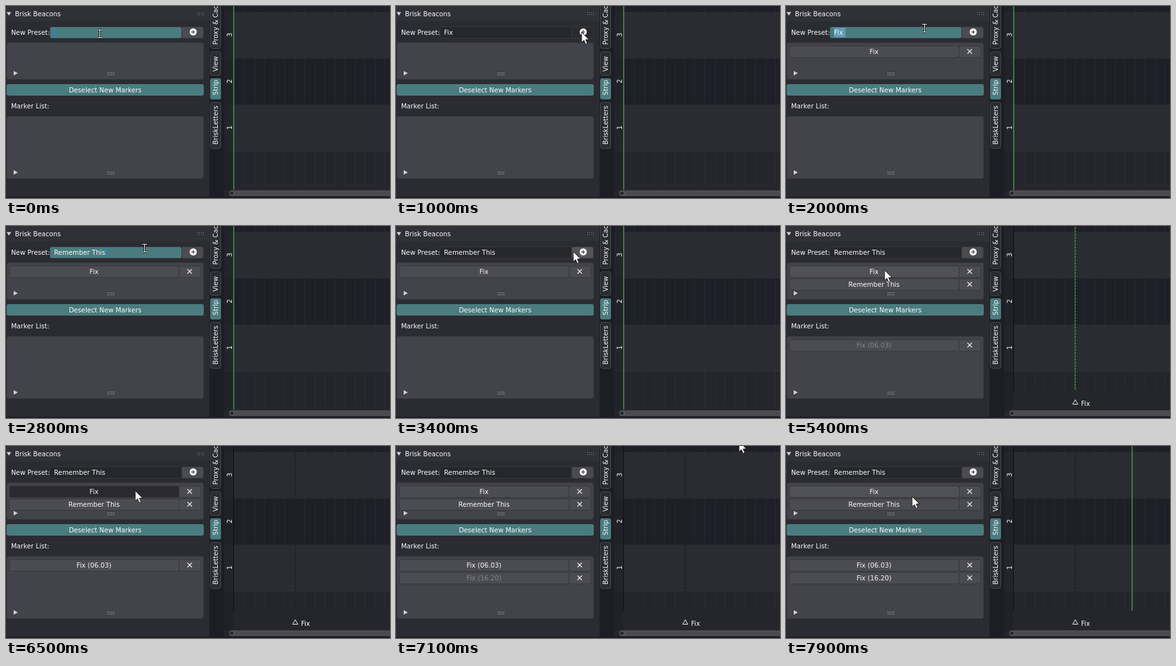
Animation of 600x300 px, one loop 8 s. Source, as an HTML page with a canvas:

```html
<!DOCTYPE html>
<html lang="en">
<head>
<meta charset="utf-8">
<style>
html, body { margin: 0; width: 100%; height: 100%; overflow: hidden; background: #2b2c31; }
canvas { display: block; }
</style>
</head>
<body>
<canvas id="stage" width="600" height="300"></canvas>
<script>
const g = document.getElementById('stage').getContext('2d');
const LOOP = 8000, SECOND = 15.75, ORIGIN = 356;
const TEAL = '#4a7b7f', TEXT = '#fafafc', BUTTON = '#4b4b52', EDGE = '#37373d', DOWN = '#2a2a2e';
const timeX = s => ORIGIN + s * SECOND;
const FIRST = timeX(6 + 3 / 24), SECOND_MARK = timeX(16 + 20 / 24);

// Each move: start, end, then the place reached
const pointerMoves = [
  [600, 1000, 290, 41], [1100, 1300, 220, 36], [1900, 2000, 216, 34],
  [2900, 3400, 277, 40], [3800, 4400, 453, -11], [4600, 5100, 154, 69],
  [5600, 5800, 588, 2], [5800, 6000, 202, 70],
  [6800, 7200, 541, -8], [7400, 7900, 197, 79]
];
const headMoves = [[4200, 4500, FIRST], [5600, 5900, SECOND_MARK], [7100, 7300, 541]];

// Ease out from one resting place to the next
function follow(start, moves, t) {
  let p = start;
  for (const [from, to, ...goal] of moves) {
    const f = Math.min(1, Math.max(0, (t - from) / (to - from)));
    const e = 1 - (1 - f) ** 3;
    p = p.map((v, i) => v + (goal[i] - v) * e);
  }
  return p;
}

const within = (v, a, b) => v >= a && v < b;

function rect(x, y, w, h, color) {
  g.fillStyle = color;
  g.fillRect(x, y, w, h);
}

function box(x, y, w, h, fill, edge, r = 3) {
  g.beginPath();
  if (edge) g.roundRect(x + .5, y + .5, w - 1, h - 1, r);
  else g.roundRect(x, y, w, h, r);
  g.fillStyle = fill;
  g.fill();
  if (edge) {
    g.lineWidth = 1;
    g.strokeStyle = edge;
    g.stroke();
  }
}

function poly(points, fill, edge) {
  g.beginPath();
  points.forEach(p => g.lineTo(...p));
  g.closePath();
  g.lineWidth = 1;
  if (fill) { g.fillStyle = fill; g.fill(); }
  if (edge) { g.strokeStyle = edge; g.stroke(); }
}

function disc(x, y, r, color) {
  g.beginPath();
  g.arc(x, y, r, 0, 7);
  g.fillStyle = color;
  g.fill();
}

function line(x1, y1, x2, y2, color, width = 1) {
  g.beginPath();
  g.moveTo(x1, y1);
  g.lineTo(x2, y2);
  g.strokeStyle = color;
  g.lineWidth = width;
  g.stroke();
}

function label(s, x, y, align = 'left', color = TEXT) {
  g.font = '10.2px "DejaVu Sans", sans-serif';
  g.textAlign = align;
  g.fillStyle = color;
  g.fillText(s, x, y + 4);
}

function upright(s, x, y, align) {
  g.save();
  g.translate(x, y);
  g.rotate(-Math.PI / 2);
  label(s, 0, 0, align);
  g.restore();
}

function grip(x, y, color) {
  for (let i = 0; i < 8; i++) rect(x + i % 4 * 3, y + (i >> 2) * 3, 1, 1, color);
}

function row(s, y, { hover, pressed, dim } = {}) {
  const c = y + 9;
  box(5, y, 266, 19, pressed ? DOWN : hover ? '#505057' : BUTTON, EDGE);
  label(s, 137.5, c, 'center', dim ? '#85858b' : TEXT);
  box(270, y, 35, 19, BUTTON, EDGE);
  for (const d of [-3.5, 3.5]) line(283.5, c - d, 290.5, c + d, TEXT, 1.1);
}

function listBox(y, h) {
  const c = y + h - 10;
  box(1, y, 308, h, '#43434b', '#3a3a41');
  poly([[12, c - 3.5], [18.5, c], [12, c + 3.5]], '#cfcfd2');
  grip(159, c - 1, '#e4e4e6');
}

function drawTimeline(head, marked) {
  const end = marked ? 257 : 284;
  rect(341, 0, 259, 300, '#25262c');
  // Tracks alternate light and dark
  for (let i = 0; i < 4; i++) {
    const y = 9 + (i - 1) * 72.5;
    rect(i % 2 ? 341 : ORIGIN, Math.round(y), 259, 73, i % 2 ? '#2b2c31' : '#1e1f27');
  }
  for (let x = timeX(1); x < 600; x += SECOND) {
    rect(Math.round(x), 0, 1, 9, '#282930');
    rect(Math.round(x), 81, 1, 73, '#282930');
    rect(Math.round(x), 227, 1, end - 227, '#2c2d33');
  }
  rect(341, 226, 259, 1, '#35363a');
  rect(341, 0, 14, 288, 'rgba(28,29,35,.45)');
  rect(355, 0, 1, end, '#0d0e12');
  for (let i = 0; i < 3; i++) upright(3 - i, 349, 45 + i * 72.5, 'center');

  rect(Math.round(head) - 1, 0, 1.5, marked ? 257 : 287, '#459a4a');
  if (marked) {
    g.setLineDash([2, 3]);
    line(452, 0, 452, 257, '#0c0d10');
    g.setLineDash([]);
    poly([[452, 271.5], [456, 278.5], [448, 278.5]], null, '#eee');
    label('Fix', 461, 277);
  }

  box(349, 288, 270, 9, '#4c4c50', null, 4);
  disc(353, 292.5, 4, '#66666a');
  disc(353, 292.5, 3, '#2c2c30');
}

function drawTabs() {
  rect(318, 0, 23, 300, '#1d1e24');
  let top = -30;
  for (const [s, h] of [['Proxy & Cache', 97], ['View', 38], ['Strip', 33], ['BriskLetters', 73]]) {
    const on = s === 'Strip';
    box(319, top, 17, h, on ? TEAL : '#2b2c31', on ? null : '#48494e');
    upright(s, 326.5, top + h - 6.5);
    top += h + 4;
  }
}

function drawField(t, x, y) {
  const active = t < 700 || within(t, 1600, 2900);
  const selected = within(t, 1700, 2100);
  const text = t < 2100 ? 'Fix'.slice(0, Math.max(0, t / 100 - 1))
    : 'Remember This'.slice(0, (t - 2000) / 50);
  label('New Preset:', 8, 41);
  box(68, 32, 207, 19, active ? TEAL : '#26272b', '#38393e');
  if (selected) rect(75, 34, 18, 15, '#629bb3');
  label(text, 75, 41);
  if (active && !selected) rect(75 + g.measureText(text).width, 34, 2, 15, '#3383c4');

  const pressed = within(t, 1000, 1100) || within(t, 3600, 3700);
  const hover = within(x, 274, 309) && within(y, 32, 51);
  box(274, 32, 35, 19, pressed ? DOWN : hover ? '#54545a' : BUTTON, '#38393e');
  disc(292.5, 40.5, 5.5, '#fff');
  rect(289.5, 40, 6, 1.2, '#3a3a3f');
  rect(292, 37.5, 1.2, 6, '#3a3a3f');
}

function drawPanel(t, x, y, head) {
  rect(0, 0, 318, 300, '#2b2c31');
  rect(0, 0, 318, 24, '#303136');
  poly([[1, 9.5], [8, 9.5], [4.5, 15]], '#d4d4d7');
  label('Brisk Beacons', 14, 12);
  grip(299, 10, '#8c8d91');
  drawField(t, x, y);

  listBox(57, 58);
  const hover = top => within(x, 5, 270) && within(y, top, top + 19);
  const pressed = within(t, 5300, 5400) || within(t, 6500, 6700);
  if (t >= 1100) row('Fix', 62, { hover: hover(62), pressed });
  if (t >= 3700) row('Remember This', 82, { hover: hover(82) });

  box(1, 122, 308, 18, TEAL);
  label('Deselect New Markers', 155, 131, 'center');
  label('Marker List:', 8, 156);
  listBox(172, 98);
  // A marker under the playhead is greyed
  const dim = mark => Math.abs(head - mark) < 2;
  if (t >= 5400) row('Fix (06.03)', 177, { dim: dim(FIRST) });
  if (t >= 6700) row('Fix (16.20)', 197, { dim: dim(SECOND_MARK) });
}

function drawPointer(x, y) {
  g.save();
  g.translate(Math.round(x), Math.round(y));
  if (within(x, 68, 274) && within(y, 32, 51)) {
    for (const [color, w] of [['#15191b', 3], ['#fff', 1]]) {
      line(.5, -5, .5, 6, color, w);
      for (const end of [-5.5, 6.5]) line(-3, end, 4, end, color, w);
    }
  } else {
    poly([[0, 0], [0, 16], [3.7, 12.6], [6.3, 18.5], [9, 17.4], [6.4, 11.7], [11.5, 11.5]],
      '#fff', '#222');
  }
  g.restore();
}

function draw(now) {
  const t = Math.floor(now % LOOP / 100) * 100;
  const [x, y] = follow([146, 43], pointerMoves, t);
  const [head] = follow([ORIGIN], headMoves, t);
  drawTimeline(head, t >= 5400);
  drawPanel(t, x, y, head);
  drawTabs();
  rect(0, 298, 600, 2, '#1b1b23');
  drawPointer(x, y);
  requestAnimationFrame(draw);
}
requestAnimationFrame(draw);
</script>
</body>
</html>
```
